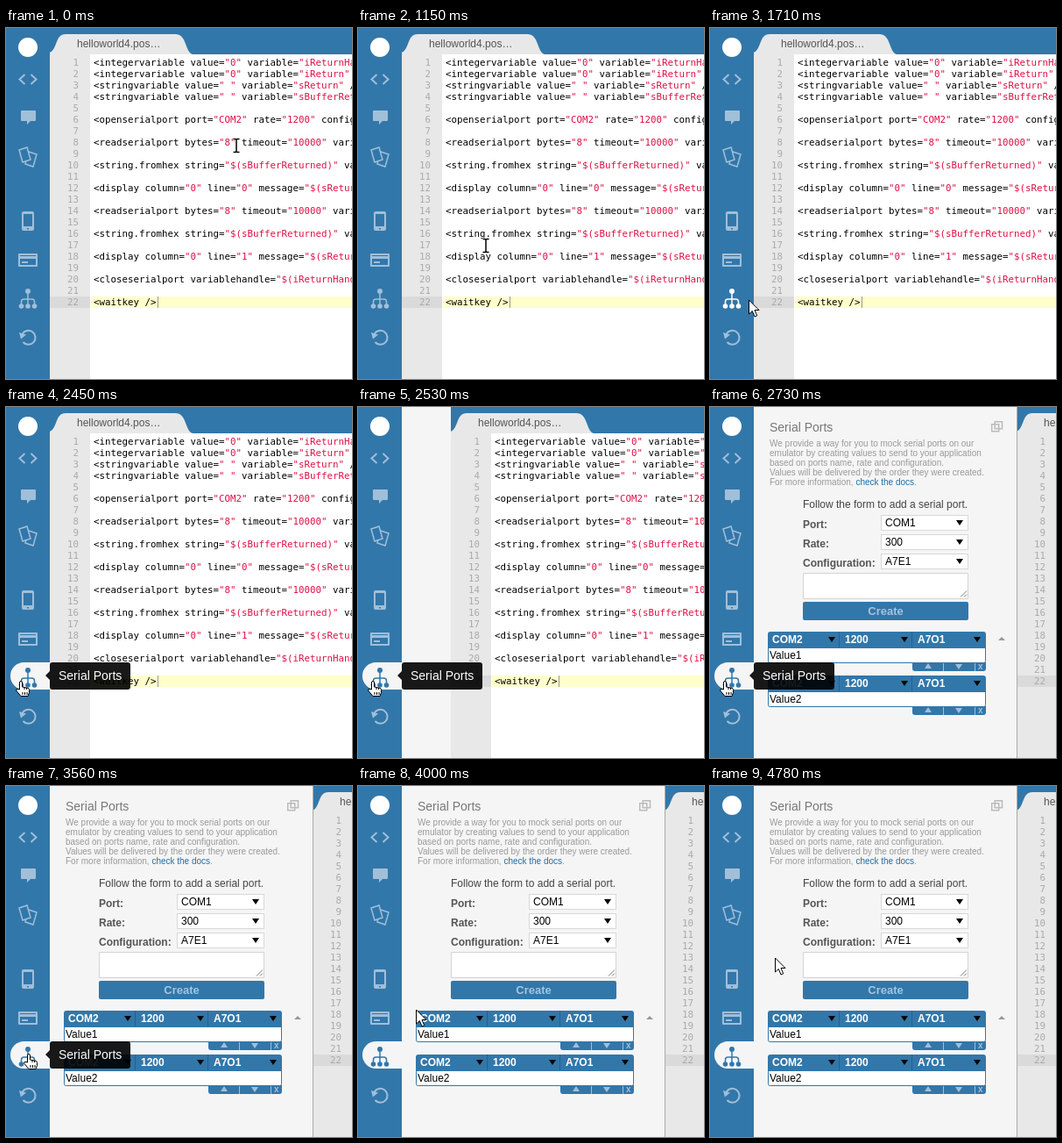
Write an HTML page that moves like this. It is 395 px wide and 400 px high and loops after 5.76 s.

```html
<!DOCTYPE html>
<html lang="en">
<head>
<meta charset="utf-8">
<title>Serial Ports</title>
<style>
html, body { margin: 0; width: 100%; height: 100%; overflow: hidden; background: #fff; }
svg { display: block; }
text { white-space: pre; font: 12px "Liberation Sans", Arial, sans-serif; }
.code text { font: 10.8px "DejaVu Sans Mono", monospace; }
.b { font-weight: bold; }
.s10 { font-size: 10px; }
.s13 { font-size: 13px; }
.s14 { font-size: 14px; }
.line { fill: none; stroke: currentColor; stroke-width: 2; }
.icons { color: #a0bfd9; fill: currentColor; }
.cursor { fill: #fff; stroke: #000; stroke-linejoin: round; }
</style>
</head>
<body>
<svg width="395" height="400" viewBox="0 0 395 400">
  <g id="editor">
    <path fill="#3277aa" d="M50 0H395V30H50z"/>
    <path fill="#e8e8e8" d="M50 30V28C59 24 56 7 68 7H193C207 7 204 27 213 30z"/>
    <text x="81" y="22" fill="#555">helloworld4.pos…</text>
    <path fill="#fff" d="M96 30H395V400H96z"/>
    <path fill="#e8e8e8" d="M50 30H96V400H50z"/>
    <path fill="#dadada" d="M50 306H96V319H50z"/>
    <path fill="#ffffcc" d="M97 306H395V319H97z"/>
    <path fill="#999" d="M173 306h1v13h-1z"/>
    <g id="code" class="code"></g>
  </g>
  <rect id="panel" x="50" width="0" height="400" fill="#f5f5f5"/>
  <g id="content">
    <path fill="#aaa" d="M350 0h1V400h-1z"/>
    <text class="s14" x="68" y="28" fill="#777">Serial Ports</text>
    <path fill="#f5f5f5" stroke="#bbb" stroke-width="1.5" d="M321.7 19.7h8v8h-8zM325.2 16.7h8.3v8h-8.3z"/>
    <g id="intro" fill="#999"></g>
    <text x="106" y="115" fill="#444">Follow the form to add a serial port.</text>
    <g id="form"></g>
    <path fill="#fff" stroke="#d4d4d4" d="M106.5 189.5h188v29h-188z"/>
    <path stroke="#777" d="M286 216.500l7-7M290 216.500l3-3"/>
    <rect x="106" y="222" width="189" height="21" rx="2" fill="#3277aa"/>
    <text class="b s13" x="200.500" y="237" text-anchor="middle" fill="#a5c4de">Create</text>
    <g id="ports"></g>
    <path fill="#999" d="M329 266l4-4 4 4z"/>
  </g>
  <path fill="#3277aa" d="M0 0H50V400H0z"/>
  <circle cx="25" cy="22" r="11" fill="#fff"/>
  <g class="icons">
    <path class="line" d="M21.500 53l-6 5.500 6 5.500M28.500 53l6 5.500-6 5.500"/>
    <path d="M18 94h15q1 0 1 1v10q0 1-1 1h-5l-4 4v-4h-6q-1 0-1-1v-10q0-1 1-1z"/>
    <path class="line" style="stroke-width:1.500" d="M15 139l9-3 4 14-9 3zM26 141l9 3-4 14-9-3 1-4"/>
    <path fill-rule="evenodd" d="M20 209h10q2 0 2 2v18q0 2-2 2h-10q-2 0-2-2v-18q0-2 2-2zM20 212v14h10v-14zM24 228v1.500h2v-1.500z"/>
    <path fill-rule="evenodd" d="M15 257h20q1 0 1 1v13q0 1-1 1h-20q-1 0-1-1v-13q0-1 1-1zM16 259v1h18v-1zM16 263v7h18v-7zM18 266h7v2h-7z"/>
    <path class="line" d="M18.500 349a8 8 0 1 1 1 9"/>
    <path d="M15 347l8 2.500-6 5z"/>
  </g>
  <path id="pill" fill="#f5f5f5" d="M50 291H20.500a15.500 15.500 0 0 0 0 31H50z"/>
  <g id="tree" fill="currentColor">
    <path class="line" style="stroke-width:1.500" d="M25 299v17M17.500 316v-4q0-3 3-3h9q3 0 3 3v4"/>
    <circle cx="25" cy="300" r="3"/>
    <circle cx="17.500" cy="317" r="2.800"/><circle cx="25" cy="317" r="2.800"/><circle cx="32.500" cy="317" r="2.800"/>
  </g>
  <g id="tip">
    <path fill="#000" opacity=".9" d="M45 306l5-5V294q0-3 3-3h86q3 0 3 3v25q0 3-3 3h-86q-3 0-3-3v-8z"/>
    <text class="s14" x="60" y="311" fill="#fff">Serial Ports</text>
  </g>
  <g id="beam">
    <path class="line" style="stroke:#fff;stroke-width:3" d="M-3.500-7.500H3.500M0-8V8M-3.500 7.500H3.500"/>
    <path class="line" style="stroke:#000;stroke-width:1.500" d="M-3.500-7.500H-1L0-6.500 1-7.500H3.500M0-7V7M-3.500 7.500H-1L0 6.500 1 7.500H3.500"/>
  </g>
  <path id="arrow" class="cursor" d="M1.500 1V17L5.300 13.500 8 20 10.700 18.800 8 12.500H13z"/>
  <g id="hand">
    <path class="cursor" d="M-1.500 8V0a1.500 1.500 0 0 1 3 0V5l6.500 1.300q1.500.500 1.500 2.200v3L8 15.500H0L-5 9.500q-.800-2 1-2.200z"/>
    <path stroke="#000" d="M2 11v3M4.500 11v3M7 11v3M4 5.500v2.500M6.500 6v2"/>
  </g>
</svg>
<script>
const $ = id => document.getElementById(id);
const esc = s => s.replace(/&/g, '&amp;').replace(/</g, '&lt;');
const text = (x, y, s, attrs = '') => `<text x="${x}" y="${y}" ${attrs}>${s}</text>`;
const down = (x, y, fill = '#000') => `<path fill="${fill}" d="M${x} ${y}h8l-4 6z"/>`;

const read = '<readserialport bytes="8" timeout="10000" variable="sBufferReturned" />';
const hex = '<string.fromhex string="$(sBufferReturned)" variable="sReturn" />';
const show = n => `<display column="0" line="${n}" message="$(sReturn)" />`;
const lines = [
  '<integervariable value="0" variable="iReturnHandle" />',
  '<integervariable value="0" variable="iReturn" />',
  '<stringvariable value=" " variable="sReturn" />',
  '<stringvariable value=" " variable="sBufferReturned" />', '',
  '<openserialport port="COM2" rate="1200" configuration="A7O1" />', '',
  read, '', hex, '', show(0), '', read, '', hex, '', show(1), '',
  '<closeserialport variablehandle="$(iReturnHandle)" />', '', '<waitkey />'
];
$('code').innerHTML = lines.map((s, i) => {
  const y = 43 + 13 * i;
  const code = esc(s).replace(/"[^"]*"/g, q => `<tspan fill="#d14">${q}</tspan>`);
  return text(83, y, i + 1, 'text-anchor="end" fill="#aaa"') + text(100, y, code);
}).join('');

$('intro').innerHTML = [
  'We provide a way for you to mock serial ports on our',
  'emulator by creating values to send to your application',
  'based on ports name, rate and configuration.',
  'Values will be delivered by the order they were created.',
  'For more information, <tspan fill="#1f6fa8">check the docs</tspan>.'
].map((s, i) => text(68, 45 + 11 * i, s, 'class="s10"')).join('');

$('form').innerHTML = [['Port:', 'COM1'], ['Rate:', '300'], ['Configuration:', 'A7E1']].map(([label, value], i) => {
  const y = 123 + 22 * i;
  return text(106, y + 15, label, 'class="b" fill="#555"') +
    `<rect x="195.5" y="${y + .5}" width="99" height="17" fill="#fff" stroke="#d8d8d8"/>` +
    text(200, y + 13, value) + down(281, y + 6);
}).join('');

const port = (y, value) => `<g transform="translate(0 ${y})">
  <path fill="#3277aa" d="M66 19V3q0-3 3-3h243q3 0 3 3v16zM231 35h84v7q0 3-3 3h-78q-3 0-3-3z"/>
  <path fill="#fff" stroke="#3277aa" d="M66.500 18.500h248v15q0 2-2 2h-244q-2 0-2-2z"/>
  <path fill="#25608f" d="M147 0h1v18h-1zM230 0h1v18h-1z"/>
  <path fill="#a0bfd9" d="M245 42l4-6 4 6zM266 36h1v9h-1zM302 36h1v9h-1z"/>
  ${['COM2', '1200', 'A7O1'].map((s, i) => text(71 + 83 * i, 13, s, 'class="b" fill="#fff"') + down(135 + 83 * i, 6)).join('')}
  ${down(280, 37, '#a0bfd9')}${text(306, 43, 'x', 'class="b s10" fill="#a0bfd9"')}${text(68, 31, value)}</g>`;
$('ports').innerHTML = port(256, 'Value1') + port(306, 'Value2');

// Progress in n steps of 40 ms, the first one landing at time a
const steps = (t, a, n) => Math.min(n, Math.max(0, Math.floor((t - a) / 40) + 1)) / n;
const smooth = p => p * p * (3 - 2 * p);
const mix = (a, b, p) => a + (b - a) * p;
const bow = (p, k) => 1 - (1 - p) ** k;

function pointer(t) {
  if (t < 1150) {
    const p = steps(t, 40, 18) ** 1.2;
    return [mix(263, 147, p), mix(134, 247, p)];
  }
  if (t < 3480) {
    const p = smooth(steps(t, 1150, 21));
    return [mix(147, 17, p), mix(247, 314, bow(p, 1.57))];
  }
  const p = smooth(steps(t, 3480, 33) ** .8);
  return [mix(17, 73, bow(p, 2.84)), mix(314, 195, p)];
}

const toggle = (id, on) => $(id).style.display = on ? '' : 'none';

function draw(now) {
  const t = now % 5760;
  const [x, y] = pointer(t).map(Math.round);
  const active = t >= 2450;
  const slide = Math.round(150 - 150 * Math.cos(Math.PI * steps(t, 2490, 7)));
  $('editor').setAttribute('transform', `translate(${slide})`);
  $('panel').setAttribute('width', slide);
  toggle('content', slide === 300);
  toggle('pill', active);
  toggle('tip', active && x < 50);
  $('tree').style.color = active ? '#3277aa' : x < 50 ? '#fff' : '#a0bfd9';
  const shape = x < 42 ? 'hand' : active || x < 97 ? 'arrow' : 'beam';
  for (const id of ['hand', 'arrow', 'beam']) toggle(id, id === shape);
  $(shape).setAttribute('transform', `translate(${x} ${y})`);
  requestAnimationFrame(draw);
}
const start = performance.now();
requestAnimationFrame(function first() { draw0(); });
function draw0() {
  const tick = () => { frame(performance.now() - start); };
  tick();
}
function frame(now) { draw(Math.max(0, now)); }
</script>
</body>
</html>
```
